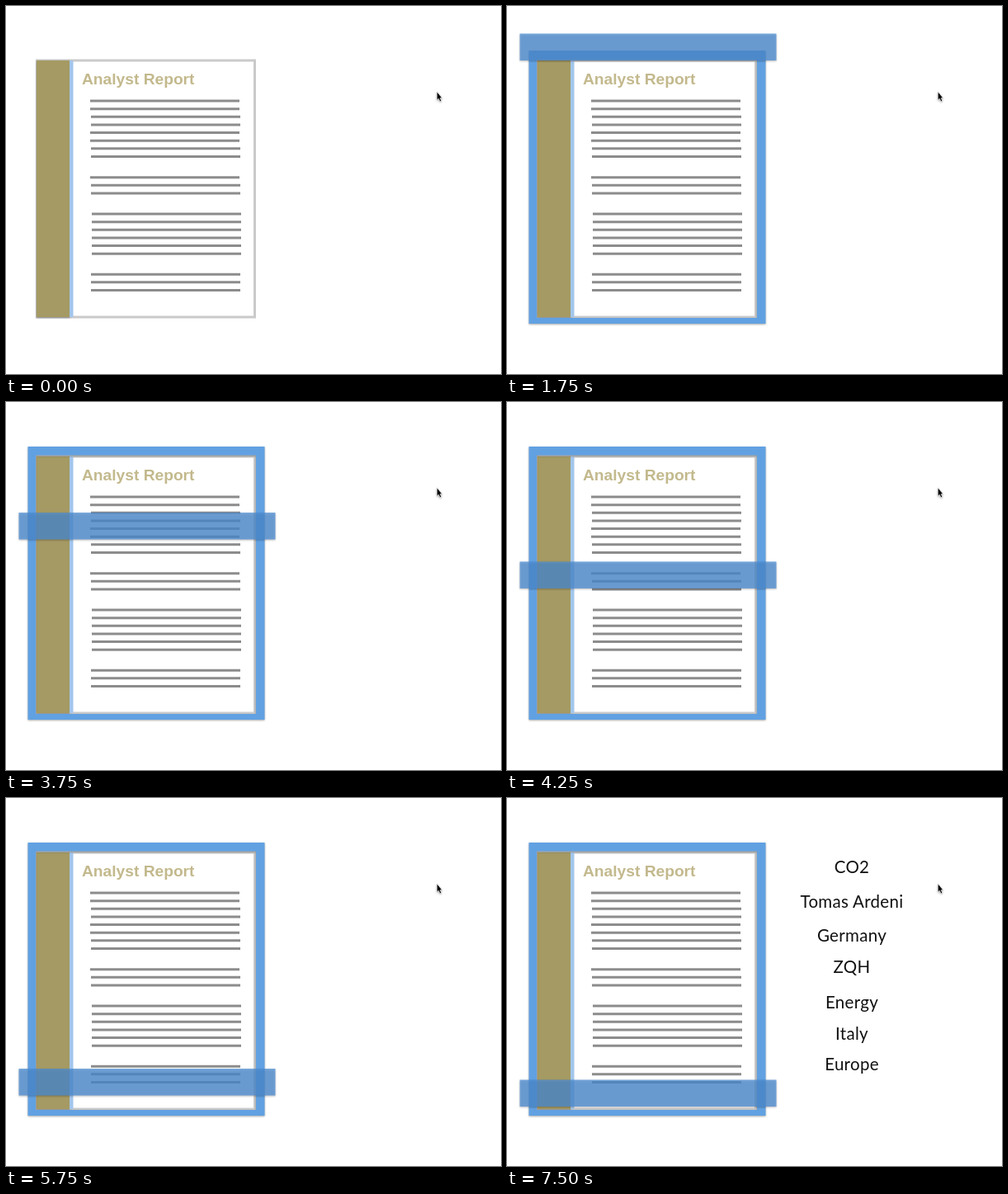
An HTML page for the animation above (9750 ms loop, 600 px wide and 446 px high).

```html
<!DOCTYPE html>
<html lang="en">
<head>
<meta charset="utf-8">
<title>Report scan</title>
<style>
  html, body { margin: 0; width: 100%; height: 100%; overflow: hidden; background: #fff; }
  svg { display: block; }
  .title { font: bold 19.2px "Liberation Sans", Arial, sans-serif; fill: #c3b98d; }
  #labels { font: 20.5px Lato, sans-serif; letter-spacing: .3px; text-anchor: middle; fill: #111; }
  .shadow { filter: drop-shadow(0 1.5px 1px rgba(0, 0, 0, .35)); }
</style>
</head>
<body>
<svg width="600" height="446" viewBox="0 0 600 446">
  <rect x="37.5" y="66" width="264" height="311" fill="#fff" stroke="#cacaca" stroke-width="3"/>
  <rect class="shadow" x="37" y="66" width="40.5" height="311" fill="#a59a63"/>
  <rect x="77" y="66" width="4.5" height="311" fill="#a3c6ec"/>
  <text class="title" x="92" y="95">Analyst Report</text>
  <path id="lines" stroke="#8c8c8c" stroke-width="3"/>
  <g id="scanner">
    <path class="shadow" fill="#61a1e2" fill-rule="evenodd"
      d="M26.5 54H313.5V385H26.5ZM36 64.5V378H303V64.5Z"/>
    <rect id="bar" class="shadow" x="15.5" width="311" height="32.5" fill="#4e8fd6" fill-opacity=".75"/>
  </g>
  <g id="labels"></g>
  <path d="M522.3 103.8V114L524.4 112.2L526 115.8L527.7 115L526.2 111.6H528.6Z"
    fill="#000" stroke="#fff" stroke-width=".6" style="filter:drop-shadow(0 1px .8px rgba(0,0,0,.35))"/>
</svg>
<script>
const $ = id => document.getElementById(id);
const LOOP = 9750, STEP = 250;

// Text lines: [first y, count, left edge]; the left edge varies slightly by row
const blocks = [
  [115, 8, i => 102 + (i >> 1) % 2],
  [207.7, 3, i => 102 + (i > 0)],
  [252, 6, () => 104],
  [325.2, 3, () => 103]
];
let d = '';
for (const [y, count, left] of blocks)
  for (let i = 0; i < count; i++) d += `M${left(i)} ${y + i * 9.63}h181`;
$('lines').setAttribute('d', d);

const words = [
  ['CO2', 91], ['Tomas Ardeni', 133], ['Germany', 174], ['ZQH', 212],
  ['Energy', 255], ['Italy', 293], ['Europe', 330]
];
$('labels').innerHTML = words.map(([w, y]) => `<text x="418" y="${y}">${w}</text>`).join('');

const clamp = (v, lo, hi) => Math.min(hi, Math.max(lo, v));

// Constant acceleration, cruise, then constant braking
function barY(t) {
  const top = 33.5, travel = 308, start = 2.015, total = 4.37, ramp = 1.78;
  const speed = travel / (total - ramp), accel = speed / ramp;
  const s = clamp(t / 1000 - start, 0, total);
  if (s < ramp) return top + accel * s * s / 2;
  if (s > total - ramp) return top + travel - accel * (total - s) ** 2 / 2;
  return top + speed * (s - ramp / 2);
}

function draw(now) {
  const t = Math.floor(now % LOOP / STEP) * STEP;
  $('scanner').setAttribute('opacity', clamp((t - 500) / 1250, 0, 1));
  $('bar').setAttribute('y', barY(t));
  $('labels').setAttribute('visibility', t >= 7000 ? 'visible' : 'hidden');
  requestAnimationFrame(draw);
}
draw(0);
</script>
</body>
</html>
```
